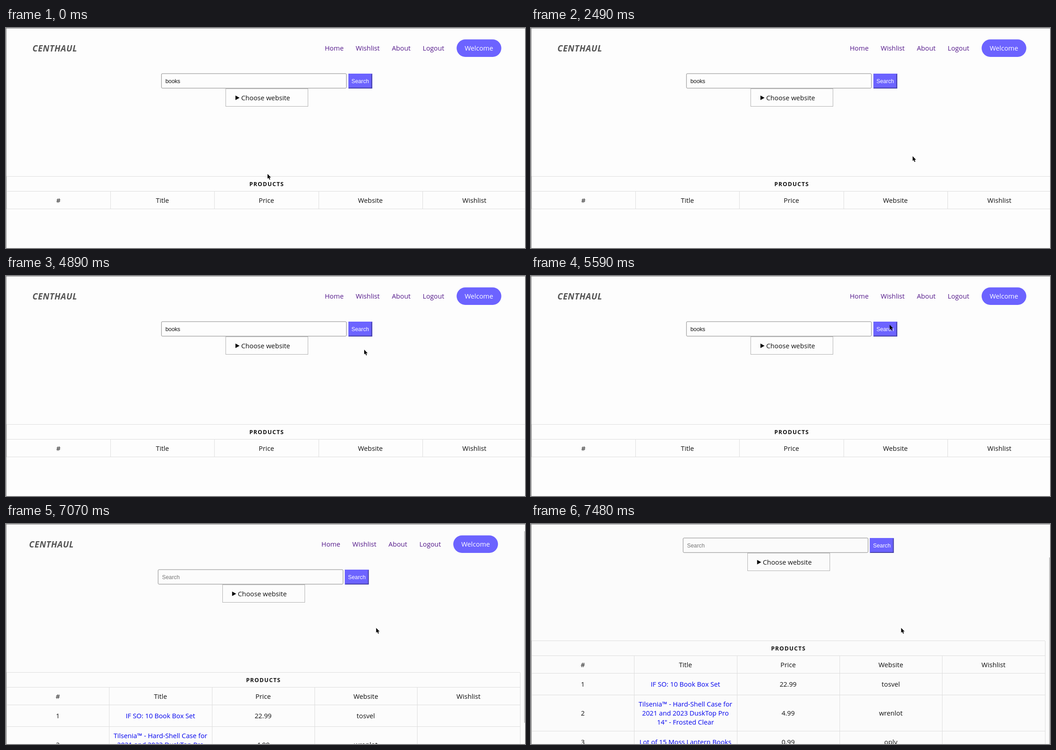
Recreate the animation shown at these times as an HTML page. Size 1149 by 487 pixels, loop 8000 ms.

```html
<!DOCTYPE html>
<html lang="en">
<head>
<meta charset="utf-8">
<title>Price search</title>
<style>
  html, body { margin: 0; width: 100%; height: 100%; overflow: hidden; background: #fdfdfd; }
  svg { display: block; }
  text { font: 14.72px "Open Sans", sans-serif; text-anchor: middle; fill: #111; }
  rect, line { shape-rendering: crispEdges; }
  .round { shape-rendering: auto; }
  .logo { font-size: 19px; font-weight: 700; font-style: italic; letter-spacing: .03em; text-anchor: start; fill: #555; }
  .nav { fill: #551a8b; }
  .white { fill: #fff; }
  .form { font: 12.27px "Liberation Sans", Arial, sans-serif; }
  .query { text-anchor: start; }
  .hint { fill: #757575; }
  .caption { font-size: 12.5px; font-weight: 700; letter-spacing: .1em; }
  .link { fill: #0000ee; }
  .grid { stroke: #ddd; }
</style>
</head>
<body>
<svg width="1149" height="487" viewBox="0 0 1149 487">
  <rect id="page" width="1149" height="487"/>
  <g id="before"></g>
  <g id="after"></g>
  <rect id="thumb" x="1147" width="2" height="424" fill="#c6c6c6"/>
  <path d="M0 .5H1149M.5 0V487" stroke="#808080"/>
  <path id="cursor" d="M0 0V10.6L2.4 8.5 4.2 12.8 6 12 4.2 7.9H7.5Z"/>
</svg>
<script>
const $ = id => document.getElementById(id);
const LOOP = 8000, LOADED_AT = 5710, ACCENT = '#6c63ff';

const products = [
  [['IF SO: 10 Book Box Set'], '22.99', 'tosvel'],
  [['Tilsenia™ - Hard-Shell Case for', '2021 and 2023 DuskTop Pro', '14" - Frosted Clear'], '4.99', 'wrenlot'],
  [['Lot of 15 Moss Lantern Books'], '0.99', 'oply'],
];

const label = (x, y, str, cls = '') => `<text x="${x}" y="${y}" class="${cls}">${str}</text>`;
const gridLine = (x1, y1, x2, y2) => `<line class="grid" x1="${x1}" y1="${y1}" x2="${x2}" y2="${y2}"/>`;

function header(shift, query, queryClass) {
  const links = [[726.6, 'Home'], [800.8, 'Wishlist'], [875, 'About'], [946.4, 'Logout']];
  return `<g transform="translate(${shift})">
    ${label(58.5, 51.5, 'CENTHAUL', 'logo')}
    ${links.map(([x, name]) => label(x, 50.4, name, 'nav')).join('')}
    <rect class="round" x="997.6" y="25.3" width="99" height="38.6" rx="19.3" fill="${ACCENT}"/>
    ${label(1047, 50.4, 'Welcome', 'white')}
    <rect class="round" x="344.2" y="101" width="409.4" height="32.2" rx="2" fill="none" stroke="#858585"/>
    ${label(353, 121.5, query, 'form query ' + queryClass)}
    <rect x="757.7" y="101" width="53" height="33" fill="${ACCENT}"/>
    <path d="M757.7 134H810.7V101L808.7 103V132H759.7Z" fill="#4640a6"/>
    ${label(784.2, 121.5, 'Search', 'form white')}
    <rect x="486.5" y="134.5" width="182" height="39" fill="none" stroke="#b0b0b0"/>
    <path d="M508 149.5L517 154.5 508 159.5Z"/>
    ${label(574.8, 159.8, 'Choose website')}
  </g>`;
}

function table(width, rows) {
  const column = width / 5, center = i => 1 + column * (i + .5);
  let top = 400.5;
  let out = label(1 + width / 2 + .6, 350, 'PRODUCTS', 'caption');
  out += ['#', 'Title', 'Price', 'Website', 'Wishlist'].map((t, i) => label(center(i), 386.8, t)).join('');
  out += [328.5, 361.5, top].map(y => gridLine(1, y, 1 + width, y)).join('');
  rows.forEach(([title, price, site], n) => {
    const height = Math.max(48, 20 * title.length + 20), baseline = top + height / 2 + 5.3;
    out += title.map((t, i) => label(center(1), baseline + 20 * i - 10 * (title.length - 1), t, 'link')).join('');
    out += [n + 1, , price, site].map((t, i) => label(center(i), baseline, t)).join('');
    top += height;
    out += gridLine(1, top, 1 + width, top);
  });
  for (let i = 0; i <= 5; i++) {
    const x = 1.5 + column * i;
    out += gridLine(x, i % 5 ? 361.5 : 328.5, x, top);
  }
  return out;
}

$('before').innerHTML = header(0, 'books', '') + table(1151, []);
$('after').innerHTML = header(-7.4, 'Search', 'hint') + table(1136.5, products);

// The pointer jumps along a cubic curve in even steps, then rests.
const STEP = 130;
const pointerStart = [579, 323];
const moves = [
  { at: 650, steps: 4, to: [842, 384], bend: [[978, 606], [804, 329]] },
  { at: 2490, steps: 5, to: [782, 117], bend: [[856, 227], [821, -10]] },
  { at: 3930, steps: 3, to: [754, 423], bend: [[614, 180], [808, 557]] },
  { at: 4890, steps: 1, to: [793, 163] },
  { at: 5040, steps: 6, to: [793, 114], bend: [[713, 59], [812, 107]] },
  { at: 6920, steps: 2, to: [819.5, 230], bend: [[770, 140], [791, 164]] },
];

const bezier = (p, a, b, c, d) => {
  const q = 1 - p;
  return q * q * q * a + 3 * q * q * p * b + 3 * q * p * p * c + p * p * p * d;
};

function pointerAt(t) {
  let pos = pointerStart;
  for (const { at, steps, to, bend = [to, to] } of moves) {
    if (t < at) break;
    const p = Math.min(1, (Math.floor((t - at) / STEP) + 1) / steps);
    pos = pos.map((from, k) => bezier(p, from, bend[0][k], bend[1][k], to[k]));
  }
  return pos;
}

const scrollAt = t => t < 7360 ? 0 : t < 7480 ? 1 : 70;

function draw(now) {
  const t = now % LOOP, loaded = t >= LOADED_AT, offset = scrollAt(t);
  $('before').style.display = loaded ? 'none' : '';
  $('after').style.display = $('thumb').style.display = loaded ? '' : 'none';
  $('after').setAttribute('transform', `translate(0 ${-offset})`);
  $('thumb').setAttribute('y', 16 + offset * .83);
  $('page').setAttribute('fill', !loaded ? '#fdfdfd' : offset > 1 ? '#fbfbfb' : '#fcfcfc');
  $('cursor').setAttribute('transform', `translate(${pointerAt(t)})`);
}

const start = performance.now();
function tick() {
  draw(performance.now() - start);
  requestAnimationFrame(tick);
}
tick();
</script>
</body>
</html>
```
